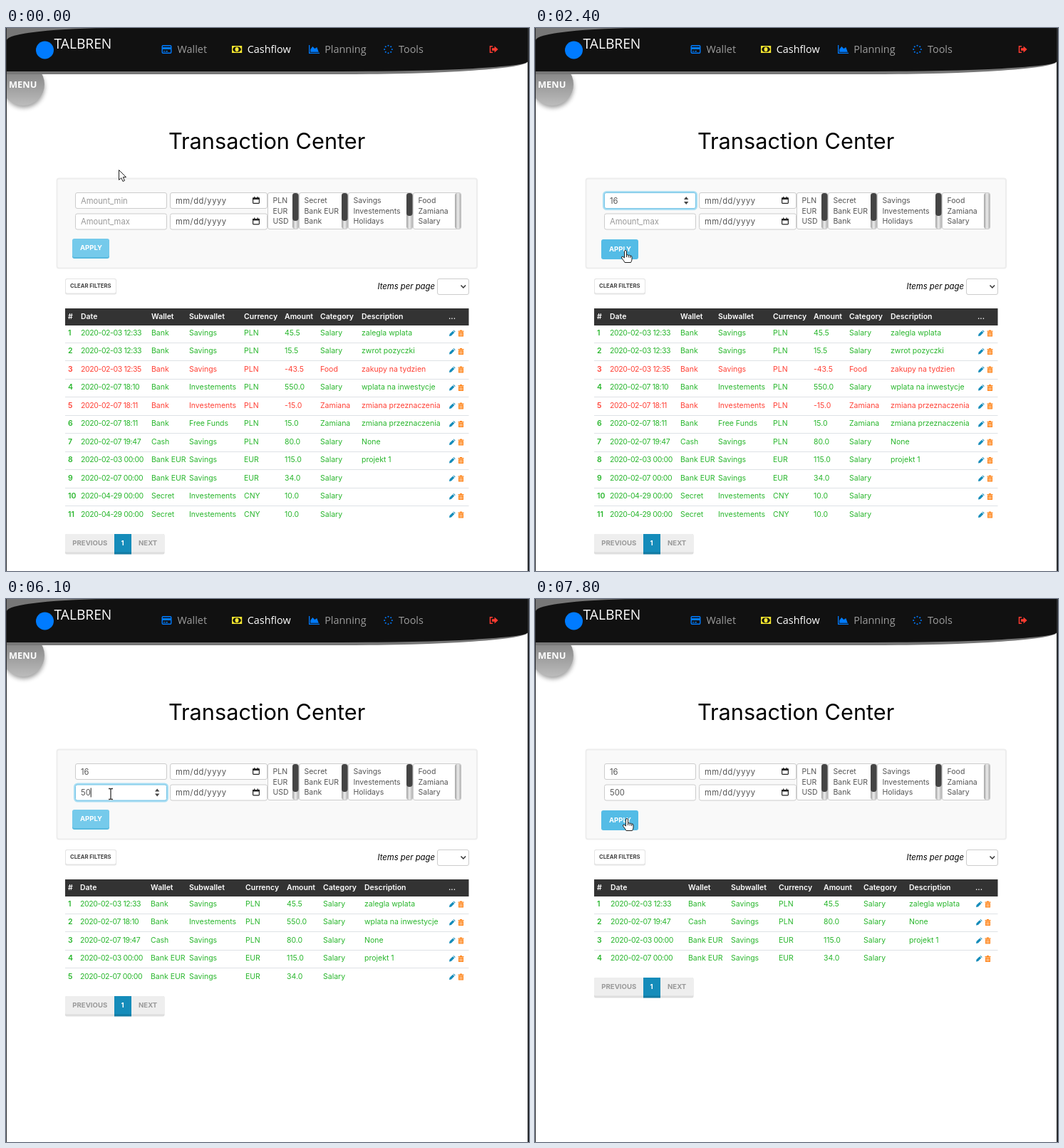
An HTML page that plays this animation: 734 by 763 pixels, repeating every 8000 ms.

```html
<!DOCTYPE html>
<html lang="en">
<head>
<meta charset="utf-8">
<title>Transaction Center</title>
<style>
html, body { margin: 0; width: 100%; height: 100%; overflow: hidden; background: #fff; }
svg { display: block; width: 734px; height: 763px; }
text { font-family: Inter, "Open Sans", sans-serif; white-space: pre; }
.nav { font: 14.4px "Open Sans", sans-serif; fill: #9c9c9c; }
.cell { font-size: 10.5px; }
.date { letter-spacing: -.4px; }
.bold { font-weight: 600; }
.field { font-size: 11.2px; fill: #555; }
.btn { font-weight: 700; }
</style>
</head>
<body>
<svg id="stage" viewBox="0 0 734 763" xmlns="http://www.w3.org/2000/svg">
  <defs>
    <linearGradient id="ball" x2="0" y2="1">
      <stop offset=".2" stop-color="#858585"/><stop offset="1" stop-color="#bcbcbc"/>
    </linearGradient>
    <linearGradient id="track">
      <stop offset="0" stop-color="#a0a0a0"/><stop offset=".5" stop-color="#ececec"/><stop offset="1" stop-color="#b0b0b0"/>
    </linearGradient>
    <filter id="soft" x="-30%" y="-30%" width="160%" height="160%"><feGaussianBlur stdDeviation="3"/></filter>
    <clipPath id="view"><rect x="1" width="731" height="763"/></clipPath>
  </defs>
  <rect width="734" height="763" fill="#2b2d30"/>
  <rect x="1" width="731" height="763" fill="#fff"/>
  <g id="page" clip-path="url(#view)"></g>
  <path id="status" fill="#25272a"/>
  <g id="cursor"></g>
</svg>
<script>
const NS = 'http://www.w3.org/2000/svg';
const $ = id => document.getElementById(id);
const page = $('page');

function add(parent, tag, attrs, str) {
  const el = document.createElementNS(NS, tag);
  for (const k in attrs) el.setAttribute(k, attrs[k]);
  if (str !== undefined) el.textContent = str;
  parent.appendChild(el);
  return el;
}
const group = (parent = page) => add(parent, 'g', {});
const rect = (p, x, y, width, height, fill, more) => add(p, 'rect', { x, y, width, height, fill, ...more });
const path = (p, d, fill, more) => add(p, 'path', { d, fill, ...more });
const text = (p, x, y, str, cls, more) => add(p, 'text', { x, y, class: cls, ...more }, str);
const show = (el, on) => el.setAttribute('visibility', on ? 'visible' : 'hidden');
const box = (p, x, y, w, h) => rect(p, x + .5, y + .5, w - 1, h - 1, '#fff', { rx: 2.5, stroke: '#ccc' });

function drawHeader() {
  add(page, 'circle', { cx: 25, cy: 83, r: 29, fill: '#000', opacity: .4, filter: 'url(#soft)' });
  add(page, 'circle', { cx: 24, cy: 79, r: 30, fill: 'url(#ball)' });
  text(page, 4, 84, 'MENU', '', { style: 'font:700 12.8px "Open Sans",sans-serif', fill: '#fff' });
  path(page, 'M1 0H732V47A262 18 0 0 1 470 65H1Z', '#777');
  path(page, 'M1 17A155 17 0 0 1 156 0H732V47A262 14 0 0 1 470 61H1Z', '#111');
  add(page, 'circle', { cx: 54.5, cy: 31, r: 12.5, fill: '#007bff' });
  text(page, 67.5, 29, 'TALBREN', '', { style: 'font:19.2px "Open Sans",sans-serif', fill: '#fff' });

  const blue = '#007bff';
  rect(page, 219.2, 24.7, 12.6, 10.6, 'none', { rx: 1.2, stroke: blue, 'stroke-width': 1.4 });
  path(page, 'M219 27h13v3h-13zM221 32h2v1.2h-2zM224 32h3v1.2h-3z', blue);
  rect(page, 317.7, 25.7, 12.8, 8.6, 'none', { stroke: '#f7e82f', 'stroke-width': 1.4 });
  path(page, 'M318 26h3l-3 3zM330 26v3l-3-3zM318 34v-3l3 3zM330 34h-3l3-3z', '#f7e82f');
  add(page, 'ellipse', { cx: 324, cy: 30, rx: 2.5, ry: 3, fill: '#f7e82f' });
  path(page, 'M425 24h1.3v10.7H440V36H425ZM427.3 33.7V30l3-4 3 3 3-2 2.5 6.7Z', blue);
  for (let i = 0; i < 8; i++) {
    const a = i * Math.PI / 4;
    add(page, 'circle', { cx: 536.5 + 5.3 * Math.cos(a), cy: 30 + 5.3 * Math.sin(a), r: 1.05, fill: blue });
  }
  path(page, 'M683 25.7H679.5V34.3H683', 'none', { stroke: '#ff3b30', 'stroke-width': 1.5 });
  path(page, 'M682 28.3h3.6v-2.8l5 4.5-5 4.5v-2.8H682z', '#ff3b30');
  [[240.5, 'Wallet'], [338.7, 'Cashflow', '#fff'], [447.2, 'Planning'], [551, 'Tools']]
    .forEach(([x, s, c]) => text(page, x, 35, s, 'nav', c ? { style: 'fill:' + c } : {}));
}

function drawList(x, w, options, thumb) {
  box(page, x, 231, w, 52);
  rect(page, x + w - 9, 232, 8.5, 50, 'url(#track)', { rx: 3 });
  if (thumb) rect(page, x + w - 9, 232, 8.5, thumb, '#444', { rx: 4 });
  options.split(',').forEach((s, i) => text(page, x + 7.5, 246 + 14.6 * i, s, 'cell', { fill: '#555' }));
}

function drawDate(y) {
  box(page, 230, y, 137, 23);
  text(page, 238, y + 15.5, 'mm/dd/yyyy', 'field', { 'letter-spacing': .5 });
  rect(page, 346.6, y + 8.1, 8.8, 7.3, 'none', { rx: .8, stroke: '#222', 'stroke-width': 1.2 });
  path(page, `M346 ${y + 7.5}h10v2.5h-10zM348 ${y + 6}h1.3v2h-1.3zM352.7 ${y + 6}h1.3v2h-1.3z`, '#222');
}

function makeField(y, hint) {
  const glow = rect(page, 96.5, y - .5, 130, 24, 'none', { rx: 4, stroke: '#a9def3', 'stroke-width': 3 });
  const frame = box(page, 97, y, 129, 23);
  const label = text(page, 105, y + 15.5, hint, 'field');
  const caret = rect(page, 105, y + 5, 1, 13, '#222');
  const spin = path(page, `M209 ${y + 10}l3.2-4 3.2 4zM209 ${y + 13}l3.2 4 3.2-4z`, '#444');
  return (value, focus, blink, over) => {
    glow.setAttribute('opacity', focus);
    frame.setAttribute('stroke', focus > .4 ? '#75c4e6' : '#ccc');
    label.textContent = value || hint;
    label.style.fill = value ? '#555' : '#999';
    caret.setAttribute('x', 105 + (value ? label.getComputedTextLength() : 0));
    show(caret, blink);
    show(spin, over || focus > .4);
  };
}

function makeApply() {
  const ring = rect(page, 91.5, 296, 55, 31, 'none', { rx: 4, stroke: '#b5e3f5', 'stroke-width': 3 });
  const edge = rect(page, 93, 297, 52, 27, '#57b9de', { rx: 3 });
  const face = rect(page, 93, 296, 52, 26, '', { rx: 3 });
  const label = text(page, 104, 312, 'APPLY', 'btn', { 'font-size': 9.5, fill: '#fff' });
  return (over, focus) => {
    ring.setAttribute('opacity', focus);
    show(edge, !over);
    face.setAttribute('y', over ? 297 : 296);
    face.setAttribute('height', over ? 28 : 26);
    face.setAttribute('fill', over ? '#54bce6' : '#75caeb');
    label.setAttribute('y', over ? 314 : 312);
  };
}

const entries = `2020-02-03 12:33|Bank|Savings|PLN|45.5|Salary|zalegla wplata
2020-02-03 12:33|Bank|Savings|PLN|15.5|Salary|zwrot pozyczki
2020-02-03 12:35|Bank|Savings|PLN|-43.5|Food|zakupy na tydzien
2020-02-07 18:10|Bank|Investements|PLN|550.0|Salary|wplata na inwestycje
2020-02-07 18:11|Bank|Investements|PLN|-15.0|Zamiana|zmiana przeznaczenia
2020-02-07 18:11|Bank|Free Funds|PLN|15.0|Zamiana|zmiana przeznaczenia
2020-02-07 19:47|Cash|Savings|PLN|80.0|Salary|None
2020-02-03 00:00|Bank EUR|Savings|EUR|115.0|Salary|projekt 1
2020-02-07 00:00|Bank EUR|Savings|EUR|34.0|Salary|
2020-04-29 00:00|Secret|Investements|CNY|10.0|Salary|
2020-04-29 00:00|Secret|Investements|CNY|10.0|Salary|`.split('\n').map(s => s.split('|'));
const heads = ['#', 'Date', 'Wallet', 'Subwallet', 'Currency', 'Amount', 'Category', 'Description', '...'];

function makeTable(cols, min, max) {
  const g = group();
  const rows = entries.filter(r => +r[4] >= min && +r[4] <= max);
  const kinds = ['cell bold', 'cell date'];
  rect(g, 83, 394, 566.5, 24, '#333');
  heads.forEach((s, i) => text(g, cols[i], 409, s, 'cell bold', { fill: '#fff' }));
  rows.forEach((r, n) => {
    const y = 428 + 25.5 * n;
    const fill = r[4] < 0 ? '#ff4136' : '#28b62c';
    if (n) rect(g, 83, Math.round(y - 10.7) - 1, 566.5, 1, '#dee2e6');
    [n + 1, ...r].forEach((s, i) => text(g, cols[i], y + 3.9, s, kinds[i] || 'cell', { fill }));
    drawTools(g, cols[8], y + .5);
  });
  drawPager(g, Math.round(428 + 25.5 * (rows.length - 1) + 27.5));
  return g;
}

function drawTools(g, x, y) {
  const at = { transform: `translate(${x} ${y - 4})` };
  path(g, 'M1 8.5l.6-2.9L6 1.2l2.3 2.3L3.9 7.9ZM6.6 .6l.8-.7 2.3 2.3-.8 .7Z', '#158cba', at);
  path(g, 'M13.5 1h2.5V0h3v1h2.5v1.2h-8zM14 2.8h7V9h-7z', '#ff851b', at);
  path(g, 'M15.8 4v4M17.5 4v4M19.2 4v4', 'none', { ...at, stroke: '#fff', 'stroke-width': .6 });
}

function drawPager(g, y) {
  rect(g, 83, y, 139.5, 28.5, '#dedede', { rx: 2 });
  rect(g, 83, y, 139.5, 25.5, '#eee', { rx: 2 });
  rect(g, 152, y, 24, 28.5, '#127ba3');
  rect(g, 152, y, 24, 25.5, '#158cba');
  [[93.3, 'PREVIOUS', '#999'], [161.5, '1', '#fff'], [186, 'NEXT', '#999']]
    .forEach(([x, s, fill]) => text(g, x, y + 16, s, 'btn', { 'font-size': 9.6, fill }));
}

drawHeader();
text(page, 228, 170, 'Transaction Center', '', { 'font-size': 30.7 });
rect(page, 71.5, 211.5, 589.5, 126, '#f9f9f9', { rx: 3, stroke: '#ededed', 'stroke-width': 2 });
const minField = makeField(231, 'Amount_min');
const maxField = makeField(260.5, 'Amount_max');
drawDate(231);
drawDate(260.5);
drawList(367, 44, 'PLN,EUR,USD', 39);
drawList(411, 69, 'Secret,Bank EUR,Bank', 39);
drawList(480, 91, 'Savings,Investements,Holidays', 32);
drawList(571, 68, 'Food,Zamiana,Salary', 0);
const apply = makeApply();
rect(page, 83, 352, 72, 22.5, '#e4e4e4', { rx: 2.5 });
rect(page, 84, 353, 70, 19.5, '#fff', { rx: 2 });
text(page, 90, 365, 'CLEAR FILTERS', 'btn', { 'font-size': 7.7, fill: '#444' });
text(page, 521.5, 367, 'Items per page', '', { 'font-size': 11.3, 'font-style': 'italic' });
box(page, 605, 352, 45, 23);
path(page, 'M638.5 361.5l3.3 3.5 3.3-3.5', 'none', { stroke: '#333', 'stroke-width': 1.5 });
const tables = [
  makeTable([87, 105, 204, 257, 334, 391, 441, 499, 621], -1e9, 1e9),
  makeTable([87, 104, 203, 257, 336, 394, 445, 503, 621], 16, 1e9),
  makeTable([87, 106, 215, 275, 342, 405, 461, 525, 618], 16, 500)
];

// Pointer shapes, each with its hot spot at 0,0
const outline = { stroke: '#222', 'stroke-width': 1, 'stroke-linejoin': 'round' };
const shapes = { arrow: group($('cursor')), beam: group($('cursor')), hand: group($('cursor')) };
path(shapes.arrow, 'M.5 .5V14.5L3.8 11.6 6 16.5 8.5 15.4 6.3 10.6H10.5Z', '#fff', outline);
const beam = 'M-3-7.5h2Q0-7.5 0-6.5 0-7.5 1-7.5h2M0-6.5V6.5M-3 7.5h2Q0 7.5 0 6.5 0 7.5 1 7.5h2';
path(shapes.beam, beam, 'none', { stroke: '#fff', 'stroke-width': 3 });
path(shapes.beam, beam, 'none', { stroke: '#333', 'stroke-width': 1.3 });
path(shapes.hand, 'M-1.5 10V1Q-1.5-.5 0-.5T1.5 1V6Q3 5 4.2 6.5 5.5 5.6 6.7 7 9 6.5 9 9V12Q9 14 7.5 16.5H-1L-2.5 14-5.5 10Q-6 8-4 8Z', '#fff', outline);
path(shapes.hand, 'M1.5 6v3M4.2 6.5v3M6.7 7v3', 'none', outline);

const route = [[100, 158, 199], [700, 157, 242], [1100, 157, 242], [1300, 160, 236], [1700, 160, 236],
  [2400, 127, 313], [3900, 127, 313], [4000, 143, 282], [4200, 143, 282], [4500, 144, 282], [5300, 144, 282],
  [5500, 147, 274], [6100, 147, 274], [6400, 136, 308], [6500, 136, 308], [6800, 127, 314], [7100, 127, 314],
  [7200, 118, 313], [7700, 118, 313], [7800, 129, 309]];

function pointer(t) {
  const i = route.findIndex(k => k[0] > t);
  if (i === 0) return route[0].slice(1);
  if (i < 0) return route[route.length - 1].slice(1);
  const [a, b] = [route[i - 1], route[i]];
  const u = (t - a[0]) / (b[0] - a[0]);
  const e = u * u * (3 - 2 * u);
  return [a[1] + (b[1] - a[1]) * e, a[2] + (b[2] - a[2]) * e];
}

const within = (t, a, b) => t >= a && t < b;
const fade = (t, from, len) => Math.min(1, Math.max(0, (t - from) / len));
// Text typed so far, given the time of each key press
const typed = (t, str, times) => str.slice(0, times.filter(k => t >= k).length);

function render(now) {
  const t = Math.floor(now % 8000 / 100) * 100;
  const blank = within(t, 7600, 7800);
  const [x, y] = pointer(t);
  const inX = x > 97 && x < 226;
  const overMin = inX && y >= 231 && y <= 254;
  const overMax = inX && y >= 260 && y <= 283;
  const overBtn = x > 94 && x < 145 && y > 296 && y < 325;

  minField(typed(t, '16', [1000, 1200]), t < 4000 ? fade(t, 600, 200) : 0, within(t, 700, 2200), overMin);
  maxField(typed(t, '500', [5700, 6100, 6200]), fade(t, 4900, 200) * (1 - fade(t, 7100, 200)),
    within(t, 5000, 6600), overMax);
  apply(overBtn, t < 7600 ? fade(t, 7100, 200) : 0);

  const step = t < 4000 ? 0 : t < 7600 ? 1 : 2;
  tables.forEach((g, i) => g.setAttribute('display', i === step ? 'inline' : 'none'));
  page.setAttribute('display', blank ? 'none' : 'inline');

  const top = 758 + 5 * fade(t, 4200, 300);
  $('status').setAttribute('d', `M1 763V${top}H239Q242 ${top} 242 ${top + 3}V763Z`);
  show($('status'), within(t, 4000, 4500));

  const kind = within(t, 7200, 7800) ? 'arrow' : overBtn ? 'hand' : overMin || overMax ? 'beam' : 'arrow';
  for (const k in shapes) show(shapes[k], k === kind);
  $('cursor').setAttribute('transform', `translate(${x.toFixed(1)} ${y.toFixed(1)})`);
}

function loop() {
  render(performance.now());
  requestAnimationFrame(loop);
}
loop();
</script>
</body>
</html>
```
